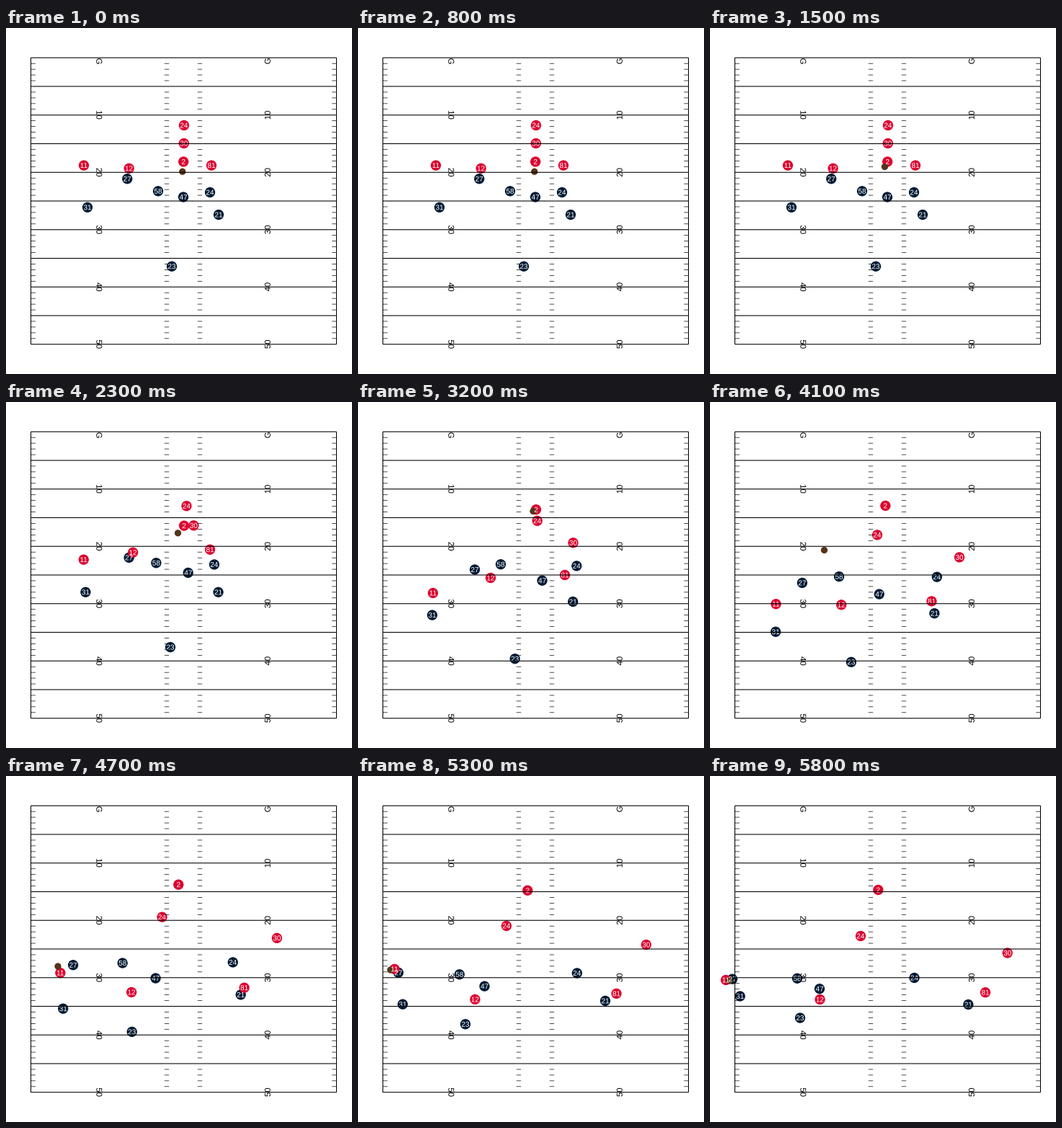
A matplotlib script that plays this animation: 480x480 px, repeating every 5.9 s.

```python
import numpy as np
import matplotlib.pyplot as plt
from matplotlib.animation import FuncAnimation
from matplotlib.patches import Circle, PathPatch
from matplotlib.path import Path
from matplotlib.textpath import TextPath
from matplotlib.transforms import Affine2D

SIZE, DPI = 480, 72
FRAMES, STEP = 59, 100
LEFT, RIGHT, TOP, YARD = 34.5, 458.5, 41.25, 7.95
HASH = 6.35
RED, NAVY, BROWN = "#dc032f", "#001a33", "#54351a"

# Each route: the spot held until the snap, then three points passed at PASS.
SNAP, PASS = 15, np.array([32, 46, 58])
OFFENSE = {
    11: [(108, 190.6), (104, 265), (78.6, 274.7), (22, 283)],
    12: [(170.7, 194.8), (184, 244), (175.8, 297.4), (152.5, 310)],
    2: [(246.2, 185.5), (247, 149.2), (240, 149.2), (233.3, 158)],
    24: [(247, 135), (248.7, 164.8), (219, 193.8), (209, 222)],
    30: [(246.8, 160), (298.5, 195.3), (371.2, 223.4), (412.7, 245.5)],
    81: [(285, 190.6), (287, 240), (326.3, 291.4), (382, 300.2)],
}
DEFENSE = {
    27: [(168.2, 209.2), (162, 232.5), (99.3, 260.4), (31, 281.7)],
    58: [(211, 226.3), (198, 225.2), (164.8, 256.5), (121, 280.8)],
    31: [(113, 248.8), (103, 295.6), (81.5, 322.8), (41.7, 305.5)],
    47: [(246, 234.5), (255.5, 247.7), (212.6, 278.3), (152, 295.2)],
    24: [(283, 228), (303.3, 227.4), (315.4, 255.7), (283.5, 280)],
    21: [(295, 259), (298.2, 277), (323, 301.8), (358.3, 317)],
    23: [(230, 330.7), (217.7, 356.2), (178.6, 356.3), (125, 335.6)],
}

# Ball as (frame, x, y): snap, drop back, straight throw, run after the catch.
BALL = np.array([(10, 244.8, 199.2), (23, 238.5, 181.8), (32, 243, 151.5),
                 (35, 245, 147), (47, 72, 264), (53, 45, 269), (58, 27, 284)]).T


def route(points):
    """Start from rest at the snap and run a quartic through the later points."""
    start, later = np.array(points[0]), np.array(points[1:])
    powers = np.arange(2, 5)
    coef = np.linalg.solve((PASS - SNAP)[:, None] ** powers, later - start)
    u = np.clip(np.arange(FRAMES) - SNAP, 0, None)
    return start + u[:, None] ** powers @ coef


def place(patch, x, y, angle=0):
    flip = Affine2D().scale(1, -1).rotate_deg(angle).translate(x, y)
    patch.set_transform(flip + ax.transData)


def write(text, size, color, z):
    """Outline text centred on its own origin."""
    glyphs = TextPath((0, 0), text, size=size, prop={"family": "Liberation Sans"})
    box = glyphs.get_extents()
    middle = [(box.x0 + box.x1) / 2, (box.y0 + box.y1) / 2]
    shape = Path(glyphs.vertices - middle, glyphs.codes)
    return ax.add_patch(PathPatch(shape, fc=color, ec="none", lw=0, zorder=z))


def disc(radius, color, z):
    return ax.add_patch(Circle((0, 0), radius, fc=color, ec="none", zorder=z))


def line(x, y, width):
    ax.plot(x, y, color="black", lw=width, snap=False, zorder=5,
            solid_capstyle="butt")


def draw_field():
    for yard in range(51):
        y = TOP + yard * YARD
        if yard % 5 == 0:
            line([LEFT, RIGHT], [y, y], 1.07)
        else:
            for x in (LEFT, 219.8, 265.8, RIGHT - HASH):
                line([x, x + HASH], [y, y], 0.7)
        if yard % 10 == 0:
            name, shift = (str(yard), 0) if yard else ("G", 4.8)
            for x, angle in ((129.3, 90), (362.8, -90)):
                place(write(name, 11.4, "black", 5), x, y + shift, angle)
    for x in (LEFT, RIGHT):
        line([x, x], [TOP, TOP + 50 * YARD], 1.07)


fig = plt.figure(figsize=(SIZE / DPI, SIZE / DPI), dpi=DPI, facecolor="white")
ax = fig.add_axes([0, 0, 1, 1])
ax.set_xlim(0, SIZE)
ax.set_ylim(SIZE, 0)
ax.axis("off")
draw_field()

players = []
for team, color, z in ((DEFENSE, NAVY, 1), (OFFENSE, RED, 2)):
    for number, points in team.items():
        parts = disc(7.15, color, z), write(str(number), 9.96, "white", 4)
        players.append((parts, route(points)))
ball = disc(4.65, BROWN, 3)


def update(i):
    for parts, track in players:
        for part in parts:
            place(part, *track[i])
    place(ball, *(np.interp(i, BALL[0], axis) for axis in BALL[1:]))
    return []


anim = FuncAnimation(fig, update, frames=FRAMES, interval=STEP, repeat=True,
                     repeat_delay=0, blit=False)
plt.show()
```
